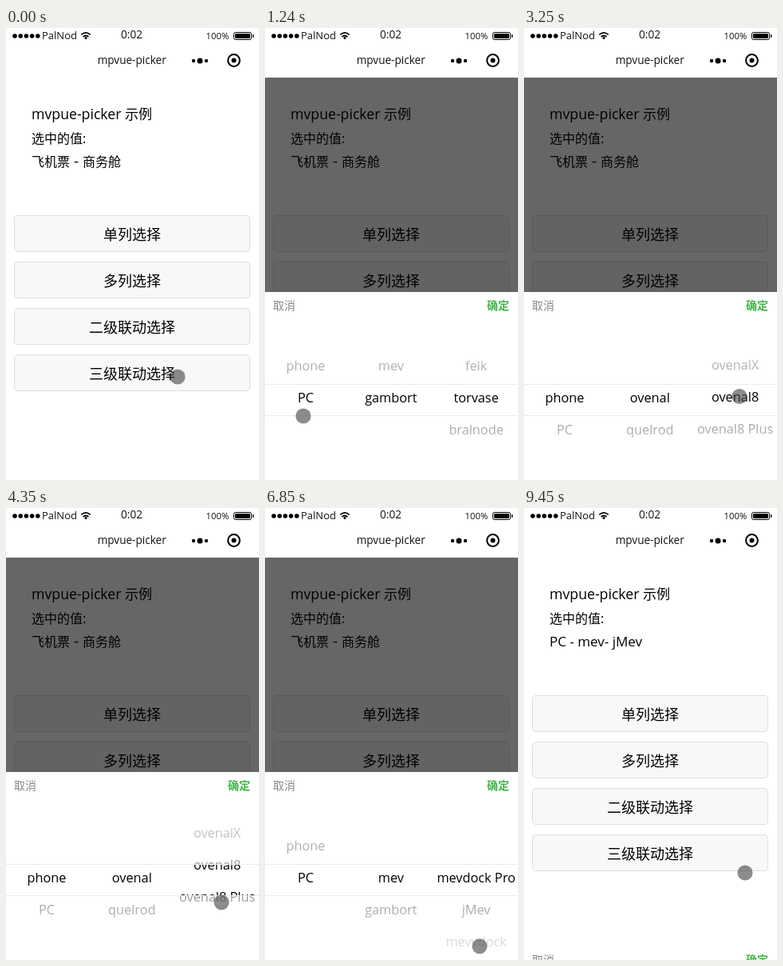
Recreate the animation shown at these times as an HTML page. Size 317 by 565 pixels, loop 9.53 s.

```html
<!DOCTYPE html>
<html lang="zh-CN">
<head>
<meta charset="utf-8">
<title>mpvue-picker</title>
<style>
html, body { margin: 0; width: 100%; height: 100%; overflow: hidden; background: #fff; }
svg { display: block; width: 317px; height: 565px; }
text { font-family: "Open Sans", "Noto Sans CJK SC", "Noto Sans CJK JP", sans-serif; fill: #000; }
.mid { text-anchor: middle; }
.btn { fill: #f8f8f8; stroke: #dedede; }
.item { font-size: 16.3px; text-anchor: middle; }
.nav text { fill: #111; }
.cancel { font-size: 14px; fill: #888; }
.confirm { font-size: 14px; font-weight: 700; fill: #44b549; }
</style>
</head>
<body>
<svg viewBox="0 0 317 565">
  <defs>
    <linearGradient id="fadeUp" x1="0" y1="0" x2="0" y2="1">
      <stop offset="0" stop-color="#fff" stop-opacity=".95"/>
      <stop offset="1" stop-color="#fff" stop-opacity=".6"/>
    </linearGradient>
    <linearGradient id="fadeDown" href="#fadeUp" x1="0" y1="1" x2="0" y2="0"/>
    <clipPath id="view"><rect y="365" width="317" height="200"/></clipPath>
  </defs>

  <g id="page">
    <text x="32" y="114" font-size="17.7">mvpue-picker <tspan font-size="17">示例</tspan></text>
    <text x="32" y="143.5" font-size="16">选中的值:</text>
    <text id="before" x="32" y="172.5" font-size="16">飞机票<tspan font-size="19"> - </tspan>商务舱</text>
    <text id="after" x="32" y="172.5" font-size="17">PC - mev- jMev</text>
  </g>

  <rect id="shade" y="62" width="317" height="503" fill-opacity=".6"/>

  <g class="nav">
    <rect width="317" height="62" fill="#fff"/>
    <g id="signal"></g>
    <text x="45" y="13.5" font-size="13">PalNod</text>
    <path d="M94.3 8.4Q100 3.4 105.7 8.4M96.6 11Q100 8 103.4 11" fill="none" stroke="#000" stroke-width="1.7"/>
    <circle cx="100" cy="12.6" r="1.5"/>
    <text class="mid" x="157.5" y="13.3" font-size="13.6">0:02</text>
    <text x="250.5" y="14" font-size="11.3">100%</text>
    <rect x="285.5" y="5.5" width="22" height="9" rx="2" fill="none" stroke="#000"/>
    <rect x="287" y="7" width="19" height="6" rx="1"/>
    <path d="M309 8h1q1 2 0 4h-1z"/>
    <text class="mid" x="157.7" y="45" font-size="13.6">mpvue-picker</text>
    <circle cx="235" cy="41" r="2.2"/>
    <circle cx="243" cy="41" r="3.5"/>
    <circle cx="251" cy="41" r="2.2"/>
    <circle cx="285.5" cy="40.5" r="7.4" fill="none" stroke="#000" stroke-width="2"/>
    <circle cx="285.5" cy="40.5" r="3"/>
  </g>

  <g id="sheet">
    <rect y="330" width="317" height="235" fill="#fff"/>
    <text class="cancel" x="10" y="352.3">取消</text>
    <text class="confirm" x="278" y="352.3">确定</text>
    <g id="columns" clip-path="url(#view)"></g>
    <rect y="365" width="317" height="80" fill="url(#fadeUp)"/>
    <rect y="485" width="317" height="80" fill="url(#fadeDown)"/>
    <path d="M0 445.5H317M0 484.5H317" stroke="#ebebeb"/>
  </g>

  <circle id="pointer" r="9.6" fill="#404040" fill-opacity=".6"/>
</svg>

<script>
const LOOP = 9530, STEP = LOOP / 123;
const OPEN = 230, CLOSE = 9210, SLIDE = 290;
const ROW = 40, SHEET = 235;

const byId = id => document.getElementById(id);
const clamp = k => Math.min(1, Math.max(0, k));
const smooth = k => k * k * (3 - 2 * k);
const easeOut = k => 1 - (1 - k) ** 3;
const show = (node, on) => { node.style.display = on ? '' : 'none'; };
const shift = (node, x, y) => node.setAttribute('transform', `translate(${x} ${y})`);

function add(parent, tag, attrs = {}, text = '') {
  const node = document.createElementNS('http://www.w3.org/2000/svg', tag);
  for (const key in attrs) node.setAttribute(key, attrs[key]);
  node.textContent = text;
  return parent.appendChild(node);
}

// Position after a list of eased moves: [begin, end, target].
function follow(start, moves, t) {
  return moves.reduce((value, [begin, end, target]) => {
    const k = easeOut(clamp((t - begin) / (end - begin)));
    return value.map((v, i) => v + (target[i] - v) * k);
  }, start);
}

for (let i = 0; i < 5; i++) add(byId('signal'), 'circle', { cx: 11 + i * 7.2, cy: 10, r: 2.8 });

['单列选择', '多列选择', '二级联动选择', '三级联动选择'].forEach((label, i) => {
  const y = 234.5 + i * 58;
  add(byId('page'), 'rect', { class: 'btn', x: 10.5, y, width: 295, height: 45, rx: 4.5 });
  add(byId('page'), 'text', { class: 'mid', x: 158, y: y + 30, 'font-size': 18 }, label);
});

// The lists of a column replace each other when a column to its left has settled.
const columns = [
  {
    lists: [{ from: 0, names: ['phone', 'PC'] }],
    row: 1,
    scroll: [[1240, 1800, [0]], [5660, 6150, [1]]]
  },
  {
    lists: [
      { from: 0, names: ['mev', 'gambort'] },
      { from: 1930, names: ['ovenal', 'quelrod'] },
      { from: 6280, names: ['mev', 'gambort'] }
    ],
    row: 1,
    scroll: [[2240, 2750, [0]]]
  },
  {
    lists: [
      { from: 0, names: ['felk', 'torvase', 'bralnode'] },
      { from: 1930, names: ['korbo', 'lunvi', 'tespa'] },
      { from: 2880, names: ['ovenalX', 'ovenal8', 'ovenal8 Plus'] },
      { from: 6280, names: ['mevdock Pro', 'jMev', 'mevvdock', 'mevvdock air'] }
    ],
    row: 1,
    scroll: [[3250, 3750, [2]], [4270, 4880, [0]], [7700, 7950, [.675]], [8130, 8350, [1]]]
  }
];

columns.forEach((col, i) => {
  const x = 51 + i * 106.8;
  for (const list of col.lists) {
    list.view = add(byId('columns'), 'g');
    list.names.forEach((name, n) => add(list.view, 'text', { class: 'item', x, y: 468 + n * ROW }, name));
  }
});

const pointerStart = [215, 436];
const pointerMoves = [
  [0, 80, [214, 434]],
  [480, 1240, [48, 485]],
  [1240, 1800, [47, 511]],
  [1850, 2240, [152, 468]],
  [2240, 2750, [154, 513]],
  [2800, 3250, [270, 462]],
  [3250, 3750, [270, 402]],
  [3800, 4270, [270, 466]],
  [4270, 4880, [270, 555]],
  [5000, 5500, [58, 462]],
  [5660, 6150, [58, 428]],
  [6200, 6640, [246, 476]],
  [6640, 6850, [269, 548]],
  [6850, 7230, [275, 554]],
  [7400, 7950, [277, 443]],
  [8130, 8600, [292, 354]],
  [8760, 9060, [295, 348]],
  [CLOSE, 9450, [277, 456]]
];

function draw(t) {
  const done = t >= CLOSE;
  const raised = smooth(clamp((t - OPEN) / SLIDE)) - smooth(clamp((t - CLOSE) / SLIDE));
  show(byId('before'), !done);
  show(byId('after'), done);
  show(byId('shade'), t >= OPEN && !done);
  shift(byId('sheet'), 0, SHEET * (1 - raised));
  shift(byId('pointer'), ...follow(pointerStart, pointerMoves, t));

  for (const col of columns) {
    const current = col.lists.findLast(list => list.from <= t);
    const [row] = follow([col.row], col.scroll, t);
    for (const list of col.lists) show(list.view, list === current);
    shift(current.view, 0, -ROW * row);
  }
}

// The screen refreshes at a steady, coarse rate.
const start = performance.now();
function tick() {
  const t = (performance.now() - start) % LOOP;
  draw(Math.floor(t / STEP + .1) * STEP);
  requestAnimationFrame(tick);
}
tick();
</script>
</body>
</html>
```
